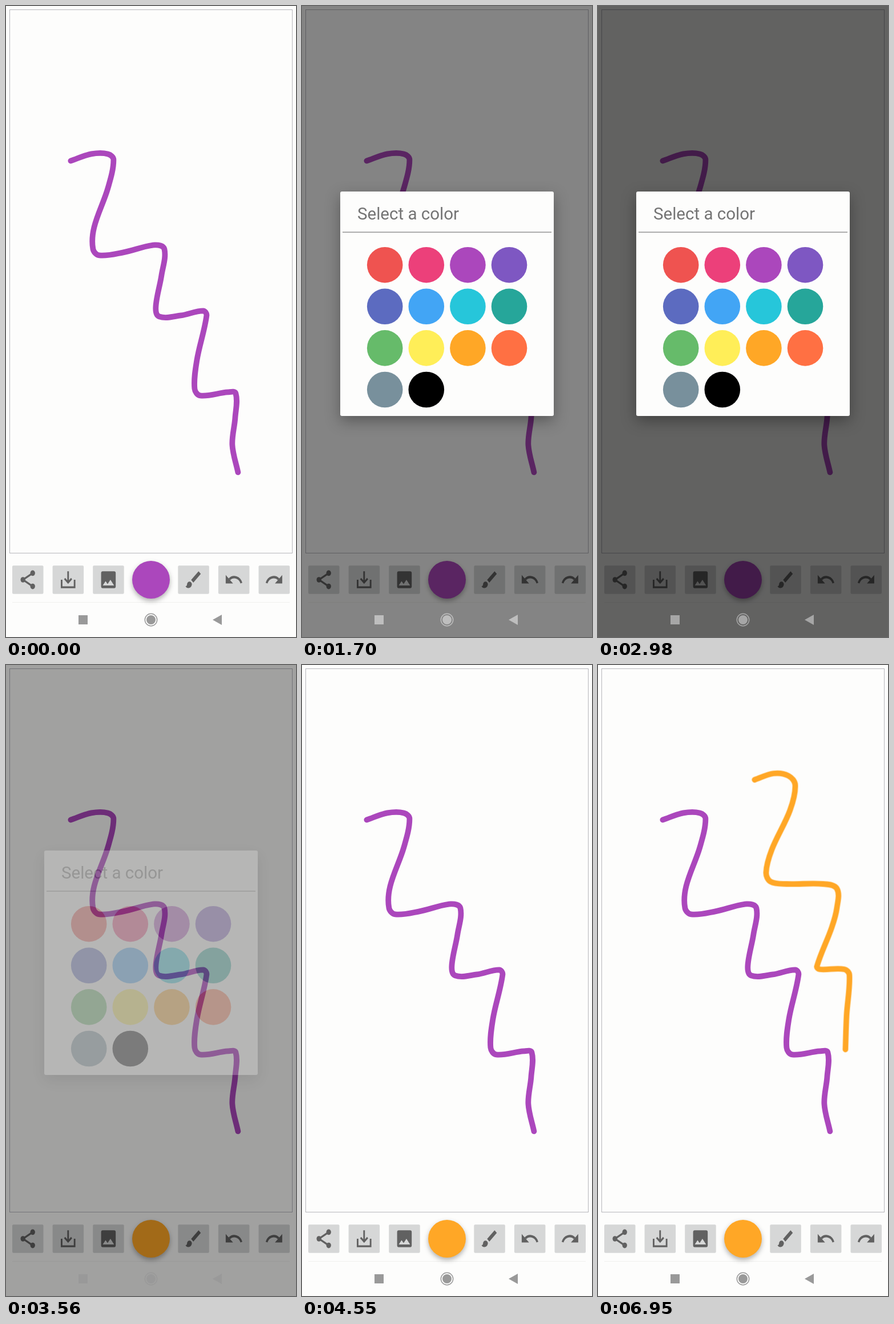
An HTML page for the animation above (6.99 s loop, 508 by 1102 pixels).

```html
<!DOCTYPE html>
<html lang="en">
<head>
<meta charset="utf-8">
<title>Drawing app</title>
<style>
  html, body { margin: 0; width: 100%; height: 100%; overflow: hidden; background: #fdfdfc; }
  svg { display: block; width: 508px; height: 1102px; }
  .line { fill: none; stroke-width: 9.8; stroke-linecap: round; stroke-linejoin: round; }
  .icon { fill: #616161; }
  .icon .pen { fill: none; stroke: #616161; }
  #fab { filter: drop-shadow(0 4px 4px rgba(0, 0, 0, .3)); }
  #sheet { filter: drop-shadow(0 9px 13px rgba(0, 0, 0, .32)); }
  #dialog { transform-origin: 254px 520px; opacity: 0; }
  #dim { opacity: 0; }
  #nav { color: #999; }
  text { font: 29.5px Roboto, Arial, sans-serif; fill: #747474; }
</style>
</head>
<body>
<svg viewBox="0 0 508 1102">
  <rect width="508" height="1102" fill="#fdfdfc"/>
  <rect x="6.5" y="6.5" width="495" height="949" fill="none" stroke="#b6b6bc"/>
  <g id="canvas" transform="translate(.4 .4)"></g>
  <path d="M11 1041.5H497" stroke="#f0f0ee"/>
  <g id="tools"></g>
  <circle id="fab" cx="254" cy="1002" r="33" fill="#ab47bc"/>
  <rect id="dim" width="508" height="1102"/>
  <g id="nav" fill="currentColor">
    <rect x="127" y="1064" width="16" height="16"/>
    <circle cx="254" cy="1072" r="8"/>
    <circle cx="254" cy="1072" r="10.7" fill="none" stroke="currentColor" stroke-width="1.5"/>
    <path d="M362 1072L378 1063V1081Z"/>
  </g>
  <g id="dialog">
    <rect id="sheet" x="67" y="324" width="374" height="392" rx="3" fill="#fdfdfc"/>
    <text x="97" y="373">Select a color</text>
    <path d="M71 395H437" stroke="#939393" stroke-width="1.4"/>
    <g id="swatches"></g>
  </g>
</svg>
<script>
const LOOP = 6990, OPEN = 1540, CLOSE = 3480, DRAW = 4800, DRAWN = 5850;
const PURPLE = '#ab47bc', ORANGE = '#ffa726';
const $ = id => document.getElementById(id);

function add(parent, tag, attrs) {
  const el = document.createElementNS('http://www.w3.org/2000/svg', tag);
  for (const key in attrs) el.setAttribute(key, attrs[key]);
  return parent.appendChild(el);
}

// steps: [time in ms, value, easing until the next step]
function play(el, prop, steps) {
  const all = [[0, steps[0][1]], ...steps, [LOOP, steps[steps.length - 1][1]]];
  el.animate(
    all.map(([t, value, easing = 'linear']) => ({ offset: t / LOOP, [prop]: value, easing })),
    { duration: LOOP, iterations: Infinity });
}

// Smooth curve through key points; handles are a third of each segment
function curve(text) {
  const pts = text.split(' ').map(p => p.split(',').map(Number));
  const handle = (i, length) => {
    const [ax, ay] = pts[Math.max(i - 1, 0)];
    const [bx, by] = pts[Math.min(i + 1, pts.length - 1)];
    const k = length / 3 / Math.hypot(bx - ax, by - ay);
    return [pts[i][0] + (bx - ax) * k, pts[i][1] + (by - ay) * k];
  };
  return pts.slice(1).reduce((d, [x, y], i) => {
    const length = Math.hypot(x - pts[i][0], y - pts[i][1]);
    return `${d}C${handle(i, length)} ${handle(i + 1, -length)} ${x},${y}`;
  }, `M${pts[0]}`);
}

const draw = (stroke, points) =>
  add($('canvas'), 'path', { class: 'line', stroke, d: curve(points), pathLength: 100 });

draw(PURPLE, '113,270 149,258 178,258 188,268 178,318 154,386 152,424 163,435 205,430 ' +
  '260,417 277,424 272,470 262,525 268,542 306,540 345,532 351,540 334,618 330,668 ' +
  '340,680 388,674 402,676 401,719 396,766 406,814');
const second = draw(ORANGE, '274,200 307,189 333,193 345,209 336,253 304,322 294,362 302,378 ' +
  '330,382 394,382 418,390 418,424 409,458 383,526 388,531 431,531 440,541 435,612 433,671');
second.style.strokeDasharray = '100.5px 110px';

// Toolbar icons on a 24-unit grid; .pen parts are outlined
const pen = (d, width = 2) => `<path class="pen" d="${d}" stroke-width="${width}"/>`;
const dot = (x, y) => `<circle cx="${x}" cy="${y}" r="2.95"/>`;
const undo = '<path d="M2 7V16H11Z"/>' + pen('M6.4 11.55A9.25 9.25 0 0 1 21.3 15.6', 2.5);
const icons = [
  pen('M18 5L6 12L18 19') + dot(18, 5) + dot(6, 12) + dot(18, 19),
  pen('M4 12V20H20V12M12 3V15M7.7 10.8L12 15L16.3 10.8'),
  '<rect x="3" y="3" width="18" height="18" rx="2"/><path fill="#d6d7d7" d="M5 18L8.5 13.5L11 16.5L14.5 12L19 18Z"/>',
  pen('M10.4 13.6L19.6 4.4', 3.9) + '<path d="M7 14a3 3 0 0 0-3 3q-.2 1.8-2 2a4.5 4.5 0 0 0 8-2a3 3 0 0 0-3-3"/>',
  undo,
  `<g transform="matrix(-1 0 0 1 24 0)">${undo}</g>`
];
icons.forEach((shape, i) => {
  const x = 11 + i * 70.6 + (i > 2 ? 78.5 : 0);
  add($('tools'), 'rect', { x, y: 977.3, width: 54.5, height: 49.5, rx: 2, fill: '#d6d7d7' });
  add($('tools'), 'g', {
    class: 'icon',
    transform: `translate(${x + 27.2} 1002) scale(1.42 1.65) translate(-12 -12)`
  }).innerHTML = shape;
});

const colors = ['#ef5350', '#ec407a', PURPLE, '#7e57c2', '#5c6bc0', '#42a5f5', '#26c6da',
  '#26a69a', '#66bb6a', '#ffee58', ORANGE, '#ff7043', '#78909c', '#000'];
colors.forEach((fill, i) => add($('swatches'), 'circle', {
  cx: 145.2 + i % 4 * 72.6, cy: 452.2 + Math.floor(i / 4) * 72.6, r: 31.3, fill
}));

play($('dim'), 'opacity', [[OPEN, 0], [OPEN + 205, .61], [CLOSE, .61], [CLOSE + 200, 0]]);
play($('dialog'), 'opacity', [[OPEN, 0, 'ease-out'], [OPEN + 150, 1], [CLOSE, 1], [CLOSE + 105, 0]]);
play($('dialog'), 'transform', [[OPEN, 'scale(.9)', 'ease-out'], [OPEN + 160, 'scale(1)']]);
play($('nav'), 'color', [[OPEN, '#999'], [OPEN + 160, '#bebebe'], [OPEN + 300, '#a6a6a6'],
  [CLOSE, '#a6a6a6'], [CLOSE + 80, '#999']]);
play($('fab'), 'fill', [[CLOSE, PURPLE, 'step-end'], [CLOSE + 1, ORANGE]]);
play(second, 'opacity', [[DRAW, 0, 'step-end'], [DRAW + 1, 1]]);
play(second, 'strokeDashoffset', [[DRAW, '100px'], [DRAWN, '0px']]);
</script>
</body>
</html>
```
